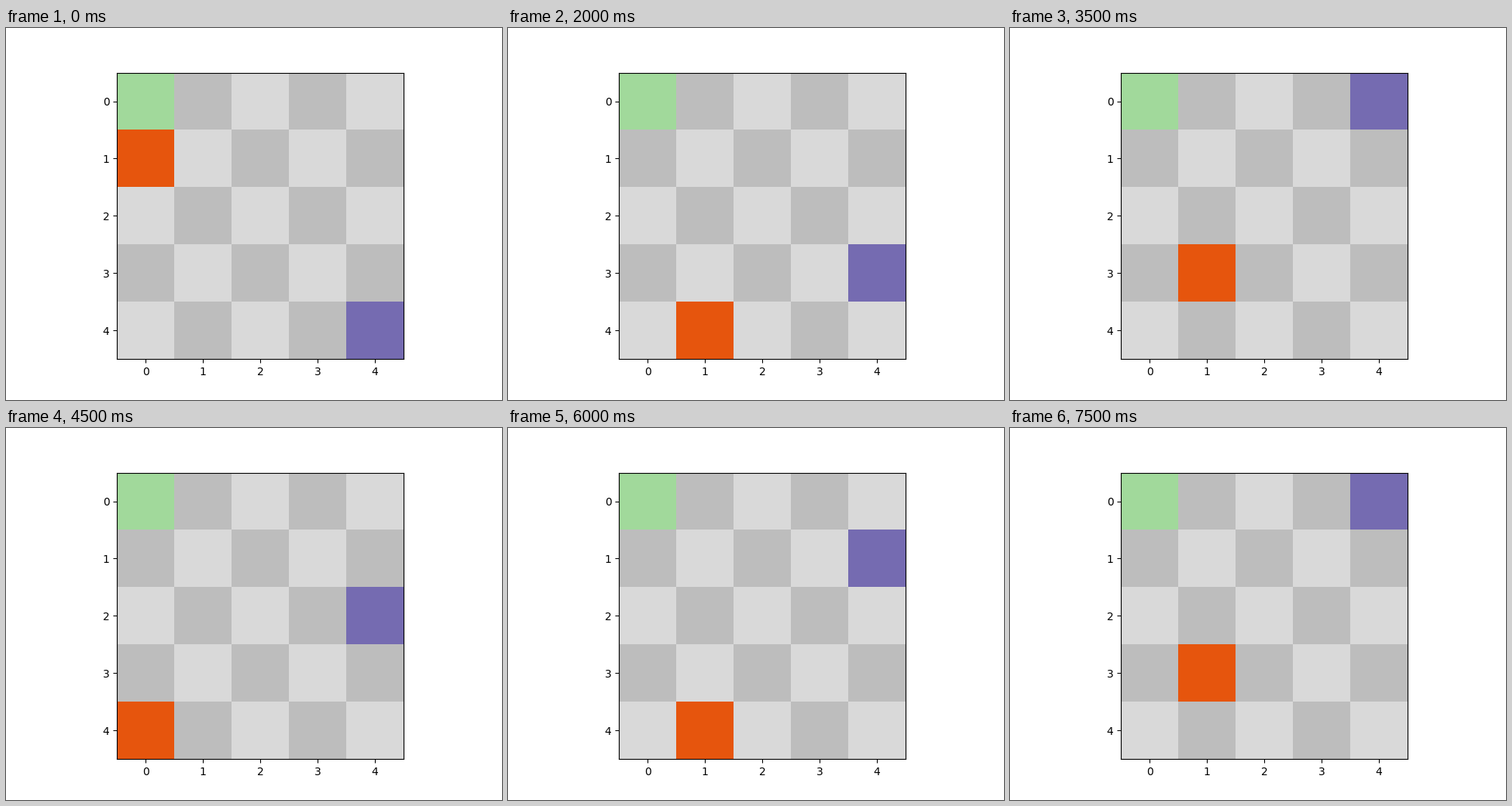
Recreate the animation shown at these times as a matplotlib script. Size 640 by 480 pixels, loop 8000 ms.

```python
import numpy as np
import matplotlib.pyplot as plt
from matplotlib.animation import FuncAnimation

SIZE = 5
STEP_MS = 500
STEPS = 16

# Indices into the tab20c palette
ORANGE, GREEN, PURPLE, DARK, LIGHT = 4, 10, 12, 18, 19

rows, cols = np.indices((SIZE, SIZE))
board = np.where((rows + cols) % 2, DARK, LIGHT)
board[0, 0] = GREEN


def orange_cell(step):
    """Walk down the left edge, then circle a 2x2 block clockwise."""
    row = 1 + step
    if row < 3:
        return row, 0
    turn = (row - 3) % 4
    return 3 + turn // 2, (turn + 1) // 2 % 2


def purple_cell(step):
    """Wait in the corner, climb to the top, then bounce two rows down and up."""
    row = 7 - step
    if row < 0:
        row = 2 - abs(2 - -row % 4)
    return min(row, SIZE - 1), SIZE - 1


def picture(step):
    grid = board.copy()
    grid[purple_cell(step)] = PURPLE
    grid[orange_cell(step)] = ORANGE
    return plt.cm.tab20c(grid)[..., :3]


fig, ax = plt.subplots(figsize=(6.4, 4.8), dpi=100)
image = ax.imshow(picture(0), interpolation="nearest")
ax.set_xticks(range(SIZE))
ax.set_yticks(range(SIZE))


def update(step):
    image.set_data(picture(step))
    return [image]


anim = FuncAnimation(fig, update, frames=STEPS, interval=STEP_MS,
                     repeat=True, repeat_delay=0, blit=False)
plt.show()
```
